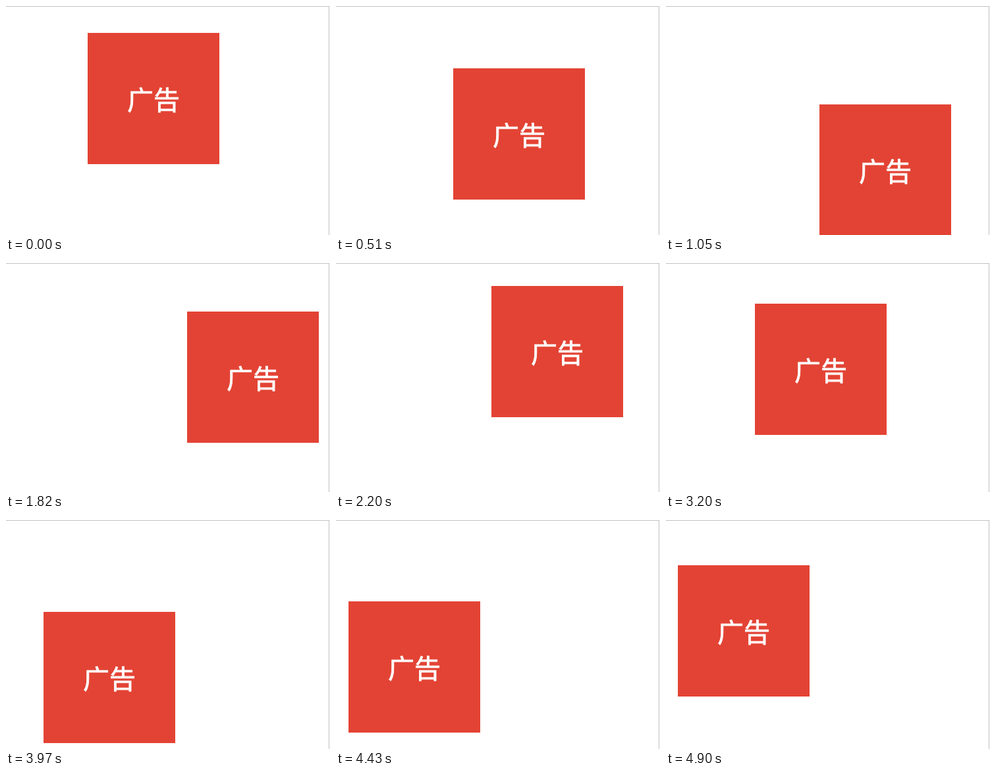
Recreate the animation shown at these times as an HTML page. Size 492x349 px, loop 4970 ms.

```html
<!DOCTYPE html>
<html lang="zh-CN">
<head>
<meta charset="utf-8">
<title>广告</title>
<style>
html, body { margin: 0; width: 100%; height: 100%; overflow: hidden; background: #fff; }
.view { position: absolute; left: 0; top: 0; width: 491px; height: 349px; overflow: hidden; }
.view::after {
  content: ""; position: absolute; inset: 0;
  border: solid rgba(0, 0, 0, .24); border-width: 1px 1px 0 0;
}
.ad {
  position: absolute; left: 0; top: 0; width: 200px; height: 200px;
  background: #e34334; color: #fff; text-align: center;
  font: 40px/200px "Noto Sans CJK SC", "Noto Sans CJK", sans-serif;
  -webkit-text-stroke: .8px #fff;
}
</style>
</head>
<body>
<div class="view"><div class="ad">广告</div></div>
<script>
const LOOP = 4970;   // ms
const STEP = 77;     // ms between redraws
const LEAD = 34;     // ms the first redraw comes early
const SPEED = 7.779; // px per redraw, on both axes

const ad = document.querySelector('.ad');

// Straight travel folded back and forth between two walls
function bounce(p, lo, hi) {
  const span = hi - lo;
  const q = (p - lo) % (2 * span);
  return lo + (q > span ? 2 * span - q : q);
}

function draw(t) {
  const step = Math.floor((t + LEAD) / STEP);
  const dist = Math.round(step * SPEED);
  ad.style.left = bounce(124 + dist, -9, 293) + 'px';
  ad.style.top = bounce(41 + dist, -2, 151) + 'px';
}

const start = performance.now();
function tick() {
  draw((performance.now() - start) % LOOP);
  requestAnimationFrame(tick);
}
draw(0);
requestAnimationFrame(tick);
</script>
</body>
</html>
```
